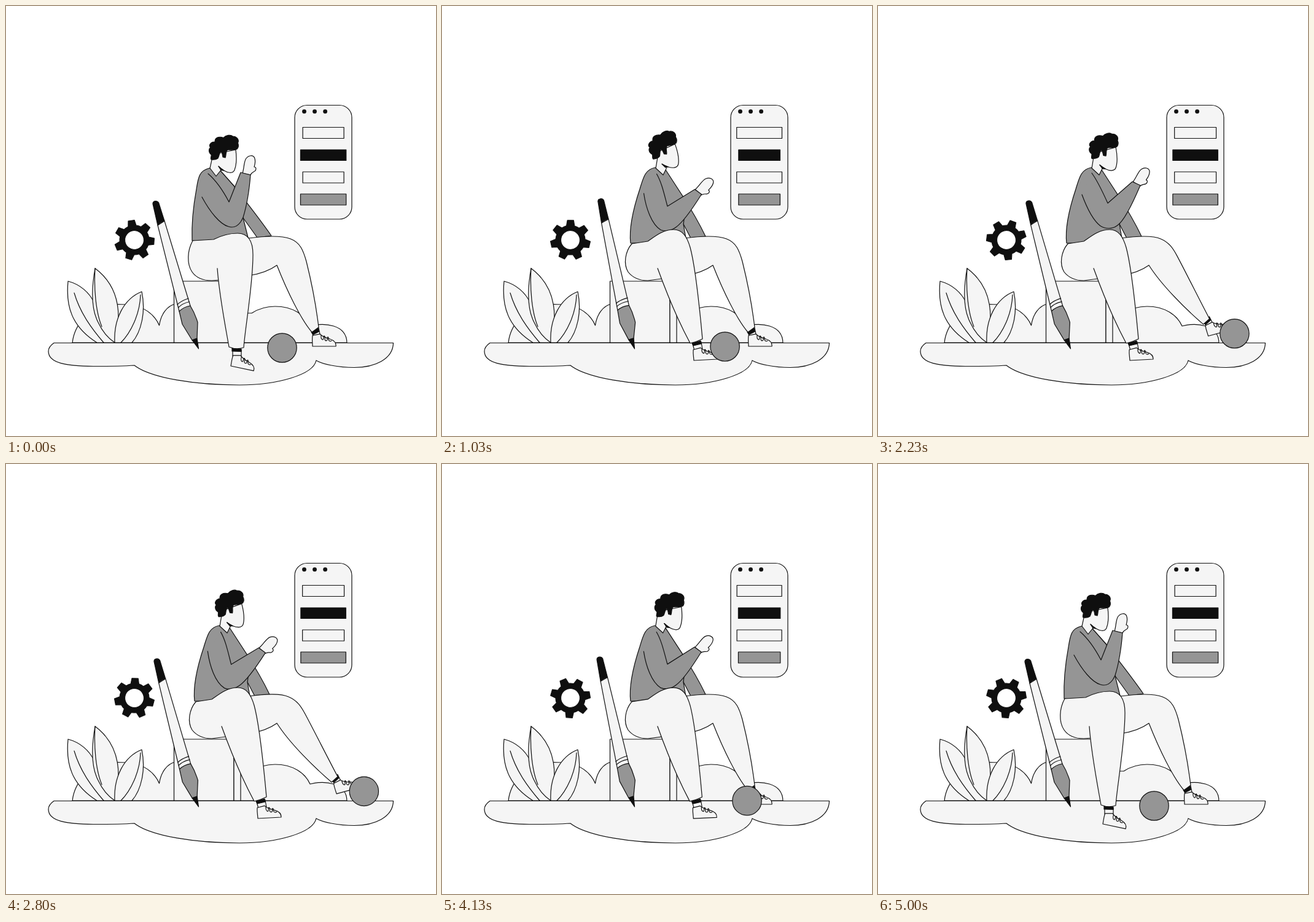
An HTML page for the animation above (5030 ms loop, 700 by 700 pixels).

```html
<!DOCTYPE html>
<html lang="en">
<head>
<meta charset="utf-8">
<title>Seated figure with ball</title>
<style>
  html, body { margin: 0; width: 100%; height: 100%; overflow: hidden; background: #fff; }
  svg { display: block; width: 100vw; height: 100vh; }
  .light { fill: #f5f5f5; }
  .grey { fill: #959595; }
  .dark { fill: #0f0f0f; }
  .line { fill: none; }
  svg * { stroke: #111; stroke-width: 1.2; stroke-linejoin: round; stroke-linecap: round; }
</style>
</head>
<body>
<svg viewBox="0 0 700 700">
  <defs>
    <g id="shoe">
      <path class="light" d="M0,0 L38,0 C39,-7 34,-10 28,-12 C21,-14 16,-16 12,-20 L0,-17.5 C-1,-11 0,-6 0,0Z"/>
      <path class="line" d="M14,-18 C13,-11 18,-8 18,-14 C18,-19 21,-17 20,-12 C20,-8 25,-8 24,-13 C24,-17 27,-15 26,-11 C27,-8 29,-8 31,-9"/>
    </g>
  </defs>

  <path class="light" d="M108,548 C112,515 140,486 180,485.5 L196,486 C223,487 242,502 249.500,520 C252,502 262,488 276,485 L382,500 L400,500 C414,491 426,489 438,489 C467,489 487,503 495,521 C518,515 554,518 555,548Z"/>
  <path class="light" d="M273.500,448 H371 V548 H273.500Z"/>
  <path class="light" d="M371,448 H382 V548 H371Z"/>
  <path class="light" d="M78,548.5 H630.500 C630,575 600,588.500 567,588.500 C540,588.500 515,583 505,577 C500,601 440,617 380,617 C310,617 236,606 209,585 C195,586 170,586.500 142,586.500 C100,586 69,582 69,562 C69,556 73,552 78,548.5Z"/>

  <path class="light" d="M101,448 C97,489 107,522 148,548 H177 L160,500 L144,484 C136,466 120,453 101,448Z"/>
  <path class="line" d="M111,467 C121,501 141,527 159,548"/>
  <path class="light" d="M145,427 C140,455 137,490 150,515 C157,530 168,542 177,548 C187,510 189,460 145,427Z"/>
  <path class="line" d="M145,427 C143,460 146,498 156,522"/>
  <path class="light" d="M221,465 C193,476 175,508 177,548 H205 C220,531 228,498 221,465Z"/>
  <path class="line" d="M219,470 C218,502 203,532 187,548"/>

  <path id="gear" class="dark" fill-rule="evenodd"/>

  <rect class="light" x="470" y="161.5" width="93" height="185.5" rx="20"/>
  <g class="dark"><circle cx="485.5" cy="171.7" r="2.8"/><circle cx="502.5" cy="171.7" r="2.8"/><circle cx="519.6" cy="171.7" r="2.8"/></g>
  <rect class="bar light" y="197.5" height="18"/>
  <rect class="bar dark" y="234" height="17.5"/>
  <rect class="bar light" y="270" height="18"/>
  <rect class="bar grey" y="306" height="18"/>

  <g id="brush">
    <path class="light" d="M247,357 L258,350 L300,488 L282,497Z"/>
    <path class="dark" d="M239,322 C239,317 246,316 248.500,320 L258,350 C254,351 250,353 247,357Z"/>
    <path class="line" d="M279,486 C284,481 291,478 297,476 M280.500,491 C285,486 292,483 298.500,481.500"/>
    <path class="grey" d="M282,497 C287,492 294,489 300,488 C305,496 309,505 312,515 L311,541 L303,544 L287,518Z"/>
    <path class="dark" d="M303,544 L311,541 L313.500,558Z"/>
  </g>

  <path id="backArm" class="grey"/>
  <path id="torso" class="grey"/>
  <path id="neck" class="light"/>
  <g id="head">
    <path class="light" d="M345,240 L374,234 C376,250 374,262 372,267 C369,274 360,271 355,268 C350,265 348,263 346,261"/>
    <path class="dark" d="M346,261 C349,264 352,266 355,268 L350,267.500Z"/>
    <path class="dark" d="M334,250 C332,247 335,245 334,242 C329,238 330,232 333,230.500 C329,226 334,221 340,221 C340,213 348,212 354,214.500 C358,210 366,209 369,212 C376,212 380,218 377.500,223 C379,227 378,231 376,233 C371,235 366,234 361,234 C357,237 359,242 357,247 L353,246 C352,241 352,238 350,237 C347,239 347,245 345,248 C341,251 337,250 334,250Z"/>
  </g>
  <g id="hand">
    <path class="light" d="M-6,-1 C-3,-10 -4,-20 0,-25 C4,-30 11,-31 13.500,-26 C16,-20 14,-15 13,-11 C17,-11 17,-5 12,-3 C10,-2 8,0 7,2Z"/>
  </g>
  <path id="arm" class="grey"/>

  <g id="farFoot">
    <path class="light" d="M498,531 L509,524 L511,534 L500,537Z"/>
    <path class="dark" d="M497,531 L508,525 L509.500,530 L500,535Z"/>
    <use href="#shoe" x="499" y="554"/>
  </g>
  <path id="farLeg" class="light"/>
  <path id="ankle" class="light"/>
  <path id="band" class="dark"/>
  <use id="nearShoe" href="#shoe"/>
  <path id="hips" class="light"/>
  <path id="nearLeg" class="light"/>

  <circle id="ball" class="grey" r="23.700"/>
</svg>

<script>
const LOOP = 5030;
const $ = id => document.getElementById(id);
const set = (el, attr, value) => el.setAttribute(attr, value);
const lerp = (a, b, k) => a + (b - a) * k;
const smooth = u => u * u * (3 - 2 * u);

// Value at time t from [time, value] steps.
function track(steps, t, ease = smooth) {
  const i = steps.findIndex(s => s[0] > t);
  if (i < 0) return steps[steps.length - 1][1];
  if (i === 0) return steps[0][1];
  const [t0, v0] = steps[i - 1], [t1, v1] = steps[i];
  return lerp(v0, v1, ease((t - t0) / (t1 - t0)));
}

// Blend two paths that share the same commands.
const NUM = /-?\d+(\.\d+)?/g;
function blend(a, b, k) {
  const to = b.match(NUM);
  let i = 0;
  return a.replace(NUM, n => lerp(+n, +to[i++], k).toFixed(2));
}

const lean = [[350, 0], [1000, 1], [4080, 1], [4750, 0]];
const kick = [[1700, 0], [2270, 1], [3090, 1], [3690, 0]];
const tilt = [[0, 0], [1030, -13], [1850, -3.7], [2300, -3.7], [3250, -11.5], [4130, 0]];
const lift = [[1030, .5], [1770, 1], [2230, 1], [3330, 0], [4130, .5]];
const roll = [[920, 449.5], [2255, 582.8], [3325, 582.8], [4570, 449.5]];

// Each part: leaning back, leaning forward.
const body = {
  backArm: [
    "M345,264 L372,294 C390,318 412,345 432,374 L409,377 L386,345 L365,300Z",
    "M361,264 L392,310 C405,330 418,352 429,375 L405,378 L393,355 L385,320Z"],
  torso: [
    "M331,264 C315,268 313,278 310,298 C305,325 302,355 303,382 L340,386 L394,377 L386,345 L372,294 L349,268Z",
    "M347,263 C331,266 328,278 322,298 C313,325 304,360 307,386 L340,386 L397,378 L393,355 L398,319 L363,265Z"],
  neck: [
    "M336,246 L332,264 L342,277 L350,267 L352,250",
    "M351,246 L348,264 L360,275 L365,265 L367,250"],
  ankle: [
    "M369,560 L383,560 L383,571 L369,570Z",
    "M408,550 L422,547 L424,559 L411,561Z"],
  band: [
    "M368,557 L383,558 L383,562.5 L368,562Z",
    "M407,549 L421,545 L422,550 L409,553Z"],
  hips: [
    "M304,382 C295,398 294,420 303,433 C310,443 322,447 335,447 L348,446 L375,440 L380,385Z",
    "M309,387 C298,400 295,420 303,433 C311,443 322,447 335,447 L358,444 L378,440 L380,385Z"],
  nearLeg: [
    "M344,427 C347,470 356,515 363,555 Q375,560 387,556 C389,525 402,455 402,405 C402,382 394,370 377,370 C362,370 350,374 338,380 L304,382",
    "M351,427 C363,460 382,508 404,549 Q414,547 424,542 C421,510 414,430 404,393 C399,376 392,364 377,364 C360,364 348,374 335,383 L309,387"]
};
const armBack = "M329,273 C343,285 353,300 363,319 L382,271 L398,275 C396,300 392,325 386,344 C380,358 371,362 362,359 C348,355 332,335 319,311";
const armLow = "M351,275 C358,290 358,310 360,331 L409,311 L418,321 C402,338 385,354 372,363 C364,369 357,372 350,371 C333,362 325,332 325,303";
const armHigh = "M348,272 C357,284 365,301 374,321 L414,286 L427,292 C416,318 401,349 390,357 C381,364 370,363 362,358 C349,348 339,326 332,307";
const farLeg = [
  "M395,378 C425,374 450,374 463,379 C479,385 484,398 489,416 C497,448 505,490 509,523 L498,531 C480,510 458,465 441,422 C430,430 415,436 395,439",
  "M395,378 C425,374 447,373 460,379 C474,385 480,394 487,407 C503,437 522,475 540,509 L530,518 C502,494 462,455 441,422 C430,430 415,436 395,439"];

function gearPath(teeth, root, tip, hole) {
  const at = (r, deg) => {
    const a = deg * Math.PI / 180;
    return (r * Math.cos(a)).toFixed(2) + "," + (r * Math.sin(a)).toFixed(2);
  };
  let d = "";
  for (let i = 0; i < teeth; i++) {
    const c = i * 360 / teeth;
    d += `${i ? `A${root},${root} 0 0 1 ` : "M"}${at(root, c - 16)} L${at(tip, c - 9)} L${at(tip, c + 9)} L${at(root, c + 16)} `;
  }
  d += `A${root},${root} 0 0 1 ${at(root, -16)}Z `;
  return d + `M${hole},0 A${hole},${hole} 0 1 0 -${hole},0 A${hole},${hole} 0 1 0 ${hole},0Z`;
}
set($("gear"), "d", gearPath(7, 24, 32.5, 15.5));

const bars = document.querySelectorAll(".bar");

function draw(t) {
  const wave = (1 - Math.cos(4 * Math.PI * t / LOOP)) / 2;
  bars.forEach((bar, i) => {
    const w = lerp(67, 74.3, i % 2 ? 1 - wave : wave);
    set(bar, "x", 516.6 - w / 2);
    set(bar, "width", w);
  });
  set($("brush"), "transform", `rotate(${3.87 * wave} 313 558)`);
  set($("gear"), "transform", `translate(209 381) rotate(${-99 + .059 * t})`);

  const p = track(lean, t);
  for (const id in body) set($(id), "d", blend(...body[id], p));
  set($("nearShoe"), "transform",
    `translate(${lerp(366, 410, p)} ${lerp(586, 577, p)}) rotate(${lerp(12, -3, p)})`);
  set($("head"), "transform",
    `translate(${16 * p} ${-1.5 * p}) rotate(${track(tilt, t) * p} 334 277)`);

  const up = track(lift, t);
  const arm = blend(armBack, blend(armLow, armHigh, up), p);
  const n = arm.match(NUM).map(Number);
  set($("arm"), "d", arm);
  set($("hand"), "transform",
    `translate(${(n[8] + n[10]) / 2 + lerp(1, 0, p)} ${(n[9] + n[11]) / 2}) rotate(${lerp(41, 20, up) * p})`);

  const k = track(kick, t);
  set($("farLeg"), "d", blend(...farLeg, k));
  set($("farFoot"), "transform", `rotate(${-15.3 * k} 455 400)`);

  const x = track(roll, t, u => u);
  set($("ball"), "cx", x);
  set($("ball"), "cy", 556.5 - (x - 449.5) * .1775);
}

const start = performance.now();
function tick() {
  draw((performance.now() - start) % LOOP);
  requestAnimationFrame(tick);
}
tick();
</script>
</body>
</html>
```
